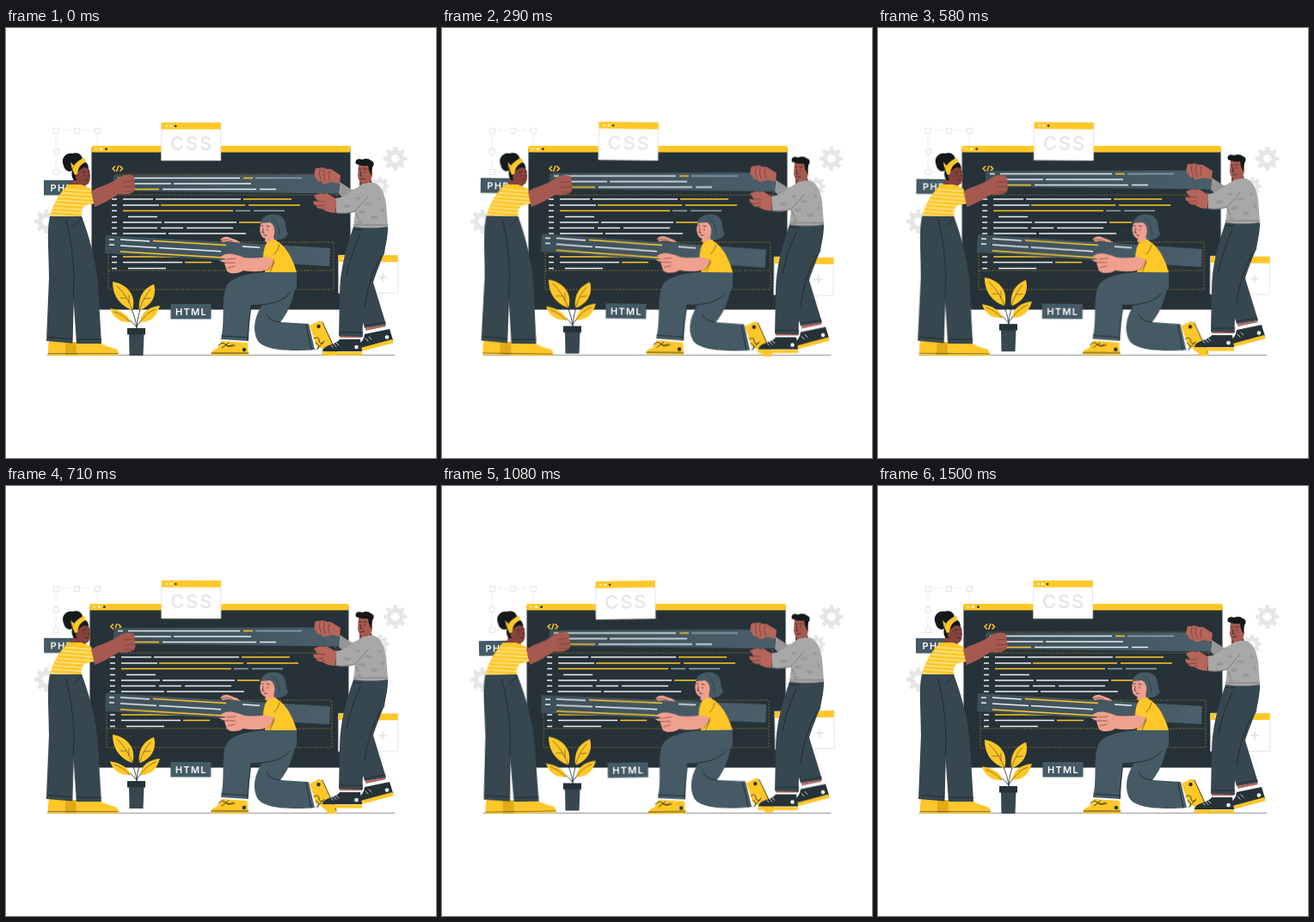
Animation of 500x500 px, one loop 1.54 s. Source, as an HTML page without scripts:

```html
<!DOCTYPE html>
<html lang="en">
<head>
<meta charset="utf-8">
<title>Building a page</title>
<style>
html, body { margin: 0; width: 100%; height: 100%; overflow: hidden; background: #fff; }
svg { display: block; width: 100%; height: 100%; }
text { font-family: Inter, Lato, sans-serif; }

/* Each cycle rests briefly after 97.4% */
.wind, .bob, .slide { animation: wind 1540ms linear infinite; transform-box: view-box; transform-origin: 250px 250px; }
.bob { animation-name: bob; }
.slide { animation-name: slide; }
.left { transform-origin: 90px 262px; }
.middle { transform-origin: 311px 298px; }
@keyframes wind {
  24.4% { transform: rotate(1deg); }
  73% { transform: rotate(-1deg); }
  97.4% { transform: none; }
}
@keyframes bob {
  48.7% { transform: translateY(-6.3px); }
  97.4% { transform: none; }
}
@keyframes slide {
  19% { transform: translateX(1px); }
  30% { transform: translateX(-1.6px); }
  46% { transform: translateX(-2.1px); }
  70% { transform: translateX(-.9px); }
  86% { transform: translateX(-.5px); }
  97.4% { transform: none; }
}

.yellow { fill: #ffc727; }
.dark { fill: #263238; }
.slate { fill: #37474f; }
.steel { fill: #455a64; }
.brown { fill: #a6594f; }
.hand { fill: #b5655a; }
.deep { fill: #85423c; }
.pink { fill: #f0a08f; }
.black { fill: #14191c; }
.code { fill: none; stroke-width: 1.5; stroke: #eceff1; }
.code.y { stroke: #ffc727; }
.code.g { stroke: #90a4ae; }
.dash { fill: none; stroke: #b8902a; stroke-width: .6; stroke-dasharray: 2 1.6; }
.ink { fill: none; stroke: #1c2529; stroke-width: .8; stroke-linecap: round; stroke-linejoin: round; }
.thin { stroke-width: .5; }
.crease { stroke: #6b332e; stroke-width: .6; }
.fold { stroke: #5f5f5f; stroke-width: .6; }
.lace { stroke: #fff; }
.pale { fill: none; stroke: #e4e4e4; stroke-width: .8; }
.tag { fill: #fff; font-size: 11px; font-weight: 600; letter-spacing: 1.3px; }
.label { fill: #e4e4e4; font-size: 22px; font-weight: 500; letter-spacing: 1.8px; }
.short { font-size: 20px; letter-spacing: .8px; }
</style>
</head>
<body>
<svg viewBox="0 0 500 500">
  <defs>
    <g id="gear" fill="none" stroke="#e6e6e6">
      <circle r="7.6" stroke-width="5.6"/>
      <circle r="11.6" stroke-width="4.4" pathLength="16" stroke-dasharray="1" stroke-dashoffset=".5"/>
    </g>
    <g id="card">
      <path d="M0 0h69v44h-69z" fill="#fff" stroke="#dcdcdc" stroke-width=".8"/>
      <path class="yellow" d="M0 0h69v7.7h-69z"/>
      <circle cx="6" cy="4" r="1.3" fill="#fff3cf"/>
      <circle cx="11" cy="4" r="1.3" fill="#fff"/>
      <circle cx="16.5" cy="4" r="1.3" class="dark"/>
    </g>
    <path id="knot" d="M-3 -3h6v6h-6z" fill="#fff" stroke="#e0e0e0" stroke-width=".8"/>
    <linearGradient id="slab">
      <stop offset="0" stop-color="#3d4f58"/>
      <stop offset="1" stop-color="#4a5f6a"/>
    </linearGradient>
    <pattern id="stripes" width="50" height="4.4" patternUnits="userSpaceOnUse" patternTransform="rotate(4)">
      <path d="M0 2h50" stroke="#fff6d8" stroke-width="1"/>
    </pattern>
  </defs>

  <!-- Backdrop -->
  <path class="pale" d="M58 119h48v48h-48z" stroke-dasharray="5 2"/>
  <use href="#knot" x="58.500" y="119.500"/><use href="#knot" x="82.500" y="119.500"/>
  <use href="#knot" x="106.500" y="119.500"/><use href="#knot" x="58.500" y="143.500"/>
  <use href="#knot" x="58.500" y="167.500"/>
  <path class="pale" d="M418 308v10h18v-9" stroke-dasharray="4 2"/>
  <use href="#gear" x="452.700" y="152"/>
  <use href="#gear" transform="translate(435 184) scale(.78)"/>
  <use href="#gear" x="47" y="225"/>
  <path class="ink thin" d="M48 380.300H452"/>

  <!-- Browser window -->
  <g class="slide">
    <path class="dark" d="M99.500 140h301v187.500h-301z"/>
    <path class="yellow" d="M99.500 137h301v7.400h-301z"/>
    <circle cx="104.500" cy="140.700" r="1.400" fill="#ffe08a"/>
    <circle cx="110.500" cy="140.700" r="1.400" fill="#fff"/>
    <circle cx="116.500" cy="140.700" r="1.400" class="dark"/>
    <path class="code y" d="M127 160.500l-3 3 3 3M132.500 160.500l3 3-3 3M131 160l-2.500 7"/>
    <path class="dash" d="M128 170h257v24h-257zM119 249h262v33h-262zM119 282v22h262v-22"/>
    <path class="code" d="M123 199h6M123 206h6M123 212.500h6M123 219.500h6M123 226h6M123 232.500h6M123 239h6M123 266h6M123 272.500h6M123 279.500h6
      M136 199h35m3 0h99M136 206h42M142 219.500h34M136 226h45m3 0h84M136 232.500h40m4 0h26m4 0h54M136 239h50m3 0h90M136 272.500h69M142 279.500h44"/>
    <path class="code y" d="M276 199h56M180 206h98m4 0h60M136 212.500h128M271 226h26M136 266h100M208 272.500h31"/>
    <path class="code g" d="M267 212.500h17m4 0h36"/>
  </g>

  <!-- Upper slab -->
  <g class="bob">
    <path fill="url(#slab)" d="M125 171l221-.5 41 .5v21.500l-262-3z"/>
    <path class="code" d="M130 174.500h6m6 0h130M142 181h50m3 0h90M182 187.500h109m4 0h19"/>
    <path class="code y" d="M276 174.500h11M142 187.500h36"/>
    <path class="code g" d="M290 174.500h54"/>
  </g>

  <!-- Tags and cards -->
  <g class="wind">
    <path class="steel" d="M44 177h46v17.500h-46z"/>
    <text class="tag" x="51.500" y="190">PHP</text>
    <path class="steel" d="M191.500 321h47v17.500h-47z"/>
    <text class="tag" x="197" y="333.800">HTML</text>
    <use href="#card" x="180.700" y="110"/>
    <text class="label" x="191" y="142">CSS</text>
    <use href="#card" x="386.700" y="264.300"/>
    <text class="label short" x="402" y="296">C++</text>
  </g>

  <!-- Plant -->
  <g class="bob">
    <path class="ink" d="M152 350C151 338 147 327 139 313M152 350C152 336 158 318 167 307M151 347Q144 337 132 333M152 347Q160 335 170 329"/>
    <g class="yellow">
      <path d="M147 328C130 322 124 309 124 295 142 298 152 312 147 328z"/>
      <path d="M155 328C153 312 161 302 172 298 176 312 168 324 155 328z"/>
      <path d="M145 342C132 343 124 336 121 326 133 328 142 333 145 342z"/>
      <path d="M156 342C157 330 167 324 179 323 175 336 168 342 156 342z"/>
    </g>
    <path class="ink thin" d="M147 328Q141 311 129 300M140 314l-7 0M143 319l0-8M155 328Q160 312 168 304M161 315l7-1M144 342Q136 333 126 330M156 342Q164 330 174 327"/>
    <path class="slate" d="M143 355h17.500l-1 26h-16z"/>
    <path class="dark" d="M141 349h21v7.500h-21z"/>
  </g>

  <!-- Woman on the left -->
  <g class="wind left">
    <path class="yellow" d="M50 364l32 1v15.500h-33q-1-8 1-16.500z"/>
    <path d="M69 366h13v14.500h-13z" fill="#e2ab16"/>
    <path class="yellow" d="M83 366l28 1q7 4 17 6 4 4 3 7.500h-49q-1-8 1-14.500z"/>
    <path class="ink thin" d="M49 378.500h33M82 378.500h48"/>
    <path class="slate" d="M62 219h26C95 238 104 265 107 300l4 67H82L77 295z"/>
    <path class="slate" d="M51 219C47 235 50 262 50 290l-3 74 30 2.500 2-76L70 219z"/>
    <path class="ink" d="M70 224Q78 255 79 290l-2 76M49 359.500l28 2M82 362h29M88 221l-10 10"/>
    <path class="deep" d="M80 172l13 8-1 9-18-3z"/>
    <path class="yellow" d="M72 182C62 192 54 206 51 219h37c-1-6 1-11 5-13l10-2-4-17-11-5z"/>
    <path fill="url(#stripes)" d="M70 186C61 196 54 208 51 219h37c-1-6 1-11 5-13l10-2-4-15z"/>
    <path class="brown" d="M99 190l7-4Q121 181 130 175 137 169 147 171q4 4 2 8 3 6 0 11-6 5-18 3Q116 203 103 208z"/>
    <path class="ink crease" d="M148 178l-11 1M150 184l-13 1M147 190l-9 0"/>
    <path class="black" d="M67 160c-4-8 3-16 10-14 8-3 14 4 11 9 6 0 8 4 8 9l-9 13-8 0c-3-4-3-8-2-11-5 2-9-1-10-6z"/>
    <path class="deep" d="M86 165q6-6 11 0l1 7q0 10-6 11-8 0-11-9 0-6 5-9z"/>
    <path class="yellow" d="M77 164c3-7 8-11 14-13l2 5c-6 2-9 6-10 14l-3 1zM79 160l-4-4 2 9z"/>
    <path class="ink" d="M89 168l3-1M95 167l2 0M91 171v1M96 171v1M93 177l3-1"/>
  </g>

  <!-- Lower slab -->
  <g class="wind">
    <path fill="url(#slab)" d="M116 241l261 15-1 21-261-15z"/>
    <path class="code" d="M120 246l6 .3M133 246l34 2M275 254l20 1.200M120 252l6 .3M133 253l42 2.400m3 .2l72 4.100"/>
    <path class="code y" d="M171 247.500l85 5M133 260l137 8"/>
  </g>

  <!-- Kneeling woman -->
  <g class="wind middle">
    <path class="pink" d="M249 246q4-4 9-3l11 4 4 3-8-1-8-1-5 1z"/>
    <path class="ink thin" d="M250 247l7-1 6 2"/>
    <path class="steel" d="M338 288C336 312 328 332 319 342l33 2 7 30C335 376 302 376 293 364c-7-12-5-30 9-48z"/>
    <path class="steel" d="M299 284C279 286 261 290 256 301c-6 15-1 40-6 61l32 2c0-14 2-28 3-41 16 0 47-4 53-22V284z"/>
    <path class="ink" d="M285 322.500C308 322 322 318 330 308M285 323Q282 343 281 363M250.500 358l31 2M349 345l6 29M319 342Q306 341 303 333"/>
    <path class="yellow" d="M353 346l10-5q5-1 7 5l15 31-2 4h-8q-5-9-14-11z"/>
    <circle cx="363.500" cy="347" r="2.200" class="dark"/>
    <path class="ink" d="M358 361q6-3 6 2t5 3M360 366q5 1 3 7M361 374l9-10M368 342l16 35"/>
    <path class="yellow" d="M251 364l30 2 1 14.500h-43q-2-5 7-8z"/>
    <circle cx="277" cy="374" r="2.200" class="dark"/>
    <path class="ink" d="M247 369q5-5 8-1t9 0M251 372l8-6M255 368q5 4 11 1M239 378h43"/>
    <path class="pink" d="M303 239l9 0 3 9-8 4-6-4z"/>
    <path class="yellow" d="M309 246C320 247 332 262 338 284h-37l5-16-7 0q0-11 4-18z"/>
    <path class="pink" d="M309 263Q300 269 277 267 263 261 255 263l-6 3 7 3-8 1q4 3 7 3l-1 1 3 9 4 2q9 1 15-3 16 3 28-1 9-8 8-17z"/>
    <path class="ink crease" d="M257 269l10-1M255 273l11 0M258 279l8-2M304 282Q311 276 312 268"/>
    <path class="yellow" d="M303 257q9-5 13 4l-2 9-13-4z"/>
    <path class="ink thin" d="M312 272l-5 12M318 252q-1 6-6 11"/>
    <path class="pink" d="M297 226q-3 8-1 13 2 6 7 6 8 0 11-9l-3-12z"/>
    <path class="steel" d="M296 227C298 217 311 214 320 219c8 6 3 13 8 20-3 6-9 8-16 7-1-2-1-4 0-7 1-6-1-11-5-13z"/>
    <path class="ink" d="M297 230l2 0M303 230l3 1M299 233v1M304 234v1M299 235l-1 3 2 0M300 241l3 0"/>
    <path class="ink thin" d="M309 221Q318 226 318 240"/>
  </g>

  <!-- Man -->
  <g class="bob">
    <path class="hand" d="M388 357h26v6h-26zM418 349l23-4 2 7-24 5z"/>
    <path fill="#fff" d="M388 360h26v3h-26zM418 352l24-5 1 4-24 5z"/>
    <path class="dark" d="M417 356l29-6 4 13-38 10-2-5q6-4 7-12z"/>
    <path class="yellow" d="M412 372l37-10 2 4-38 10z"/>
    <circle cx="443" cy="359.500" r="2.300" fill="#fff"/>
    <path class="dark" d="M388 362h24l2 14h-46q0-5 10-8 7-2 10-6z"/>
    <path class="yellow" d="M367 376.500h47v4h-46z"/>
    <circle cx="407.500" cy="371" r="2.300" fill="#fff"/>
    <path class="ink lace" d="M384 366l3 3M381 367.500l3 3M378 369l2 2M418 361l3 3M422 359l3 3"/>
    <path class="slate" d="M444 231C444 258 432 278 427 296l15 49-25 4-14-49z"/>
    <path class="slate" d="M404 231C396 255 388 280 388 310l-1 48 28 1C413 330 425 290 440 262l4-31z"/>
    <path class="ink" d="M404 234q9 2 11 0M436 266Q421 292 417 325M388 354h27M418 346l23-4M412 240q-11 22-16 48"/>
    <path fill="#969696" d="M415 185l-13 3-14-9-1 14q9 9 16 9l18-6z"/>
    <path class="deep" d="M411 175l12-2 4 9-8 6-8-4z"/>
    <path fill="#a8a8a8" d="M412 183c4-4 10-4 16-3 9 3 12 13 14 24l2 27q-20 3-40 0l2-17q-12 3-22 1l-1-17q10-1 18-8z"/>
    <g fill="#989898">
      <ellipse cx="397" cy="207" rx="4" ry="2"/><ellipse cx="409" cy="198" rx="3" ry="1.500"/>
      <ellipse cx="421" cy="204" rx="4" ry="1.500"/><ellipse cx="434" cy="198" rx="2" ry="1.500"/>
      <ellipse cx="414" cy="214" rx="4" ry="2"/><ellipse cx="428" cy="220" rx="4" ry="2"/>
      <ellipse cx="411" cy="226" rx="3" ry="1.500"/><ellipse cx="438" cy="212" rx="2" ry="2"/>
    </g>
    <path class="ink fold" d="M383 215q14 1 23-2l15-17M404 229h40M406 214l4 8M387 193l-4 5"/>
    <path class="hand" d="M359 167q0-5 5-4 5-2 9 1 5-1 8 2l8 5-1 10-9-2-7 2q-5 1-5-3-5 2-6-3-4-3-2-8z"/>
    <path class="hand" d="M358 195q7-4 13-2l2-1 11 7-1 16q-9 0-14-4-9-1-8-4-5-2-3-6l5 1z"/>
    <path class="ink crease" d="M365 164q-2 6 1 12M370 164q-2 6 1 14M376 166q-2 6 0 11M361 207l9-1M360 201l11 1M364 211l7-2"/>
    <path class="brown" d="M410 159l14 0 2 12q-1 9-8 10-8 0-9-9z"/>
    <path class="black" d="M407 158c-2-5 3-7 7-5 4-2 9-1 10 1 5 1 4 6 2 8l-1 10-3-6-1-6q-6 1-11-1z"/>
    <path class="ink" d="M410 164l3 0M416 164l3 0M412 167v1M417 167v1M413 168l-1 4 2 0M412 176l5-1"/>
  </g>
</svg>
</body>
</html>
```
